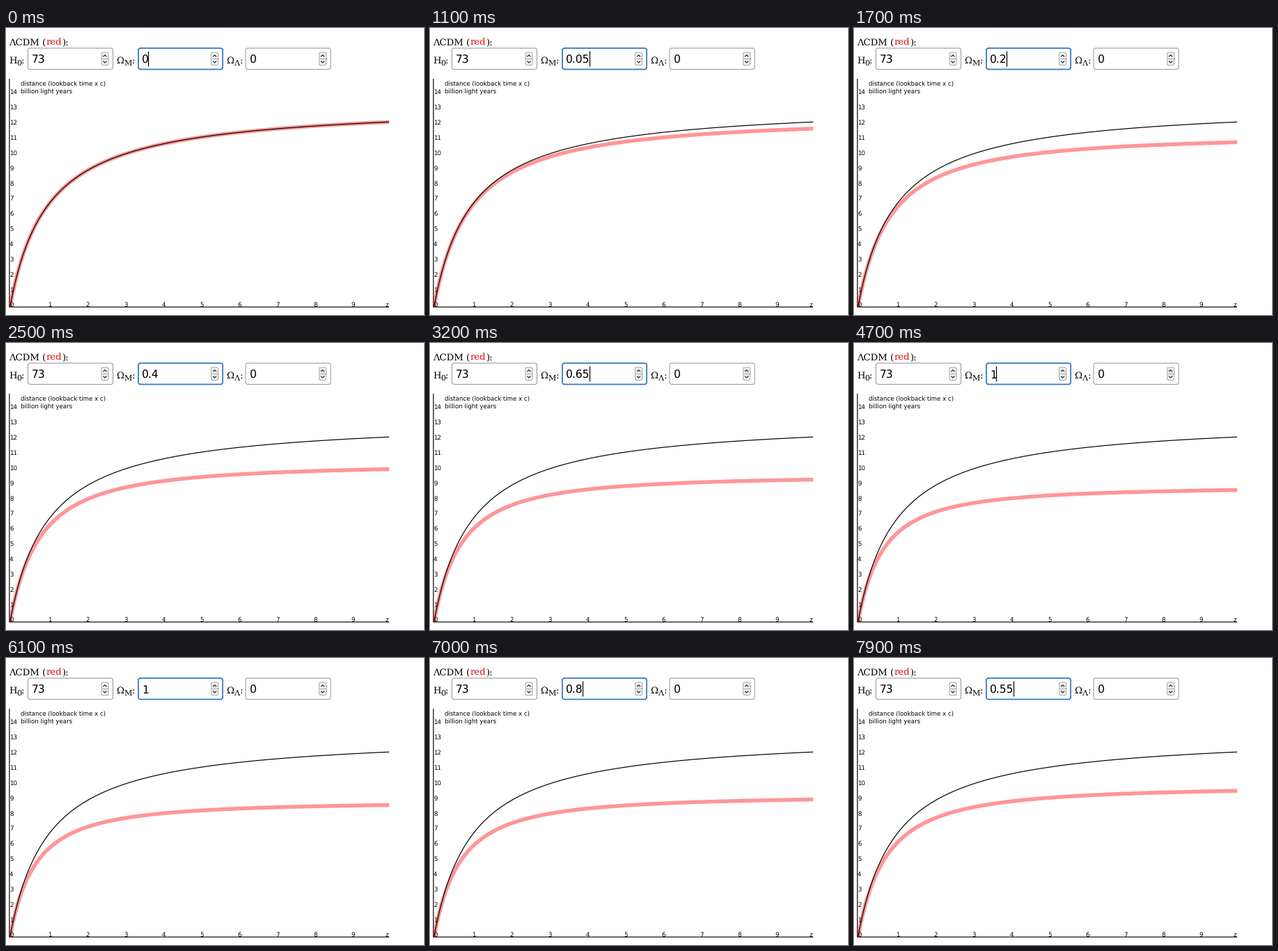
A matplotlib script that plays this animation: 600x413 px, repeating every 8 s.

```python
import numpy as np
import matplotlib.pyplot as plt
from matplotlib.animation import FuncAnimation
from matplotlib.patches import FancyBboxPatch, Rectangle

plt.rcParams["text.hinting"] = "no_hinting"
plt.rcParams["toolbar"] = "None"

W, H, DPI = 600, 413, 100
PX = 72 / DPI                      # points per pixel
STEP_MS, LOOP_MS = 100, 8000
AXIS_X, X0, Y0 = 4.9, 5.7, 401.5   # y axis, curve origin
DX, DY = 54.5, 21.87               # pixels per unit of z and per Gly
H0 = 73
HUBBLE_TIME = 977.8 / H0           # Gyr
SERIF, SANS = "DejaVu Serif", "DejaVu Sans"
VALUE_X, VALUE_SIZE = 195, 15.5

# times at which the matter density moves one step of 0.05
UP = np.array([1000, 1200, 1500, 1700, 1900, 2100, 2300, 2500, 2700, 2800,
               2900, 3100, 3200, 3400, 3500, 3700, 3900, 4100, 4300, 4700])
DOWN = np.array([6500, 6700, 6900, 7000, 7200, 7300, 7500, 7700, 7900])

fig = plt.figure(figsize=(W / DPI, H / DPI), dpi=DPI, facecolor="white")
ax = fig.add_axes([0, 0, 1, 1])
ax.set_xlim(0, W)
ax.set_ylim(H, 0)
ax.axis("off")


def text(x, y, s, size, font=SANS, color="black"):
    return ax.text(x, y, s, fontsize=size * PX, family=font, color=color,
                   ha="left", va="baseline", zorder=2)


def line(xs, ys, color="black", width=1.0, z=3, **kw):
    return ax.plot(xs, ys, color=color, lw=width * PX, zorder=z,
                   solid_capstyle="butt", **kw)[0]


def box(x, y, w, h, radius, edge, width, face):
    ax.add_patch(FancyBboxPatch(
        (x, y), w, h, boxstyle=f"round,pad=0,rounding_size={radius}",
        ec=edge, fc=face, lw=width * PX, zorder=1))


def field(x, w=122, edge="#9a9aa2", width=1.1):
    """Number input with its spin buttons."""
    box(x, 29, w, 30.5, 3, edge, width, "white")
    cx = x + w - 11.5
    box(cx - 5, 35, 10, 18.5, 2, "#a2a2a8", 0.9, "#efeff2")
    line([cx - 5, cx + 5], [44.3, 44.3], "#a2a2a8", 0.9)
    for tip, base in ((38.8, 41.2), (50, 47.6)):
        line([cx - 2.5, cx, cx + 2.5], [base, tip, base], "#222222", 1.2)


def label(x, main, sub_x, sub, colon_x):
    text(x, 50.6, main, 13.3, SERIF)
    text(sub_x, 53.6, sub, 11.1, SERIF)
    text(colon_x, 50.6, ":", 13.3, SERIF)


z = np.linspace(0, 10, 1001)


def lookback(matter):
    """Lookback distance in Gly without a cosmological constant."""
    a = 1 + z
    f = 1 / (a * np.sqrt(matter * a**3 + (1 - matter) * a**2))
    area = np.cumsum((f[1:] + f[:-1]) / 2 * np.diff(z))
    return HUBBLE_TIME * np.concatenate(([0], area))


def to_y(dist):
    return Y0 - DY * dist


# form
text(4, 25, "ΛCDM (", 13.3, SERIF)
text(57.5, 25, "red", 13.3, SERIF, "#d81010")
text(80.2, 25, "):", 13.3, SERIF)
label(4, "H", 15, "0", 22)
label(158, "Ω", 169, "M", 181)
label(316, "Ω", 327, "Λ", 335.5)
field(31.5)
field(190, 121, "#3879c4", 1.8)
field(344)
text(37, 51, str(H0), VALUE_SIZE)
text(350, 51, "0", VALUE_SIZE)
value = text(VALUE_X, 51, "0", VALUE_SIZE)
caret = line([205, 205], [33, 55], width=1.2)

# axes
line([AXIS_X] * 2, [73, 402], width=1.2, snap=False)
line([AXIS_X, 550], [Y0] * 2, width=1.1, snap=False)
text(21, 84, "distance (lookback time x c)", 8.7)
text(21, 94, "billion light years", 8.7)
for k in range(1, 15):
    text(5, to_y(k), str(k), 8.7)
for k in range(10):
    text(5.4 + DX * k, 401, str(k), 8.7)
text(544.5, 401, "z", 8.7)

# curves, cut off at the edges of the plot
xs = X0 + DX * z
red = line(xs, to_y(lookback(0)), "#ff0000", 5.5, z=4, alpha=0.41)
black = line(xs, to_y(lookback(0)), width=1.2, z=5)
plot_area = Rectangle((4, 73), 546, 329, transform=ax.transData)
for curve in (red, black):
    curve.set_clip_path(plot_area)


def caret_x(s):
    dots = s.count(".")
    return VALUE_X - 0.5 + VALUE_SIZE * (0.636 * (len(s) - dots) + 0.318 * dots)


def draw(i):
    t = i * STEP_MS
    matter = 0.05 * (np.sum(UP <= t) - np.sum(DOWN <= t))
    s = f"{matter:.3g}"
    value.set_text(s)
    caret.set_xdata([caret_x(s)] * 2)
    caret.set_visible(not (2500 <= t < 2600 or 6100 <= t < 6500))
    red.set_ydata(to_y(lookback(matter)))
    return value, caret, red


anim = FuncAnimation(fig, draw, frames=LOOP_MS // STEP_MS, interval=STEP_MS,
                     repeat=True, repeat_delay=0, blit=False)
plt.show()
```
